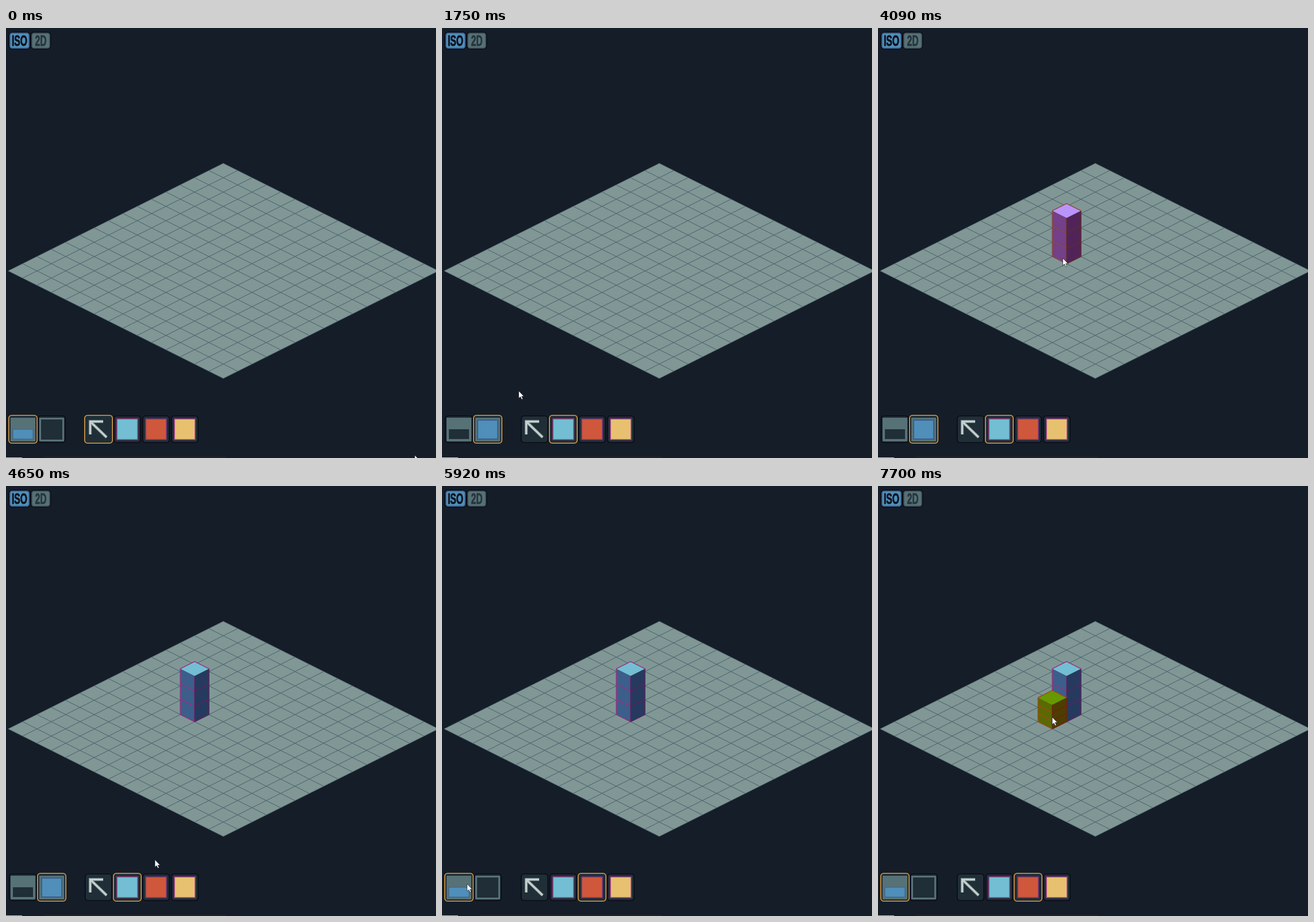
Write an HTML page that moves like this. It is 748 px wide and 748 px high and loops after 8000 ms.

```html
<!DOCTYPE html>
<html lang="en">
<head>
<meta charset="utf-8">
<title>Isometric block editor</title>
<style>
  html, body { margin: 0; width: 100%; height: 100%; overflow: hidden; background: #151d28; }
  svg { display: block; width: 100%; height: 100%; }
  .label { font: bold 25px "Liberation Sans", Arial, sans-serif; stroke-width: .9; }
  .btn { fill: #202e37; stroke: #090a14; stroke-width: 1.6; }
  .btn.on { stroke: #de9e41; }
  .edge { fill: none; stroke-width: 1.5; stroke-linejoin: round; }
</style>
</head>
<body>
<svg viewBox="0 0 748 748">
  <rect width="748" height="748" fill="#151d28"/>
  <polygon id="board" fill="#819796" stroke="#577277"/>
  <path id="lines" fill="none" stroke="#506a70" stroke-width="1.1"/>
  <polygon id="tile" fill="#958ba2"/>
  <g id="blocks"></g>
  <g id="ui"></g>
  <g>
    <rect class="btn" x="5.5" y="7.5" width="36" height="29" rx="5" style="fill:#4f8fba"/>
    <rect x="7" y="9" width="33" height="26" rx="4" fill="none" stroke="#3c5e8b" stroke-width="1.5"/>
    <rect class="btn" x="43.5" y="7.5" width="34" height="29" rx="5" style="fill:#577277"/>
    <rect x="45" y="9" width="31" height="26" rx="4" fill="none" stroke="#394a50" stroke-width="1.5"/>
    <text class="label" transform="translate(10 31) scale(.63 1)" fill="#10141f" stroke="#10141f">ISO</text>
    <text class="label" transform="translate(50.5 31) scale(.63 1)" fill="#26363e" stroke="#26363e">2D</text>
  </g>
  <path d="M66 746.5H382" stroke="#33242f"/>
  <path d="M0 747.5H28" stroke="#c7cfcc"/>
  <circle id="press" r="10" fill="#e6e41e" fill-opacity=".6"/>
  <path id="cursor" d="M0 0V13L3 10.4L5.2 15L7.3 14L5.2 9.6H9.2Z" fill="#fff" stroke="#10141f" stroke-width=".7"/>
</svg>
<script>
const $ = id => document.getElementById(id);
const LOOP = 8000, N = 15, TW = 374 / N, TH = 187 / N, OX = 378, OY = 235.5;

// start, end, x, y, easing
const smooth = p => p * p * (3 - 2 * p), out = p => p * (2 - p);
const START = [711, 743];
const MOVES = [
  [0, 520, 208, 708, smooth],
  [690, 710, 208, 707, smooth],
  [1040, 1400, 82, 700, smooth],
  [1680, 2280, 313, 391, out],
  [2280, 2360, 323, 394, smooth],
  [4020, 4840, 249, 690, smooth],
  [4980, 5560, 32, 705, out],
  [5840, 6490, 303, 402, smooth]
];
const PRESSES = [[900, 1040], [1500, 1570], [2600, 2740], [3020, 3120], [3580, 3680],
  [4890, 4980], [5740, 5830], [6670, 6770], [7050, 7190], [7560, 7700]];

// face colours: top, left, right, edge, dark edge
const STACKS = [
  { i: 5, j: 7, h: 26.6, times: [2650, 3020, 3630],
    plain: ['#73bed3', '#3c5e8b', '#253a5e', '#97307f', '#5e2260'],
    hot: ['#ba94fa', '#734089', '#502458', '#8f4a35', '#622c2a'] },
  { i: 5, j: 8, h: 14, times: [6670, 7050, 7610],
    plain: ['#cf573c', '#a53030', '#752438', '#97307f', '#5e2260'],
    hot: ['#689800', '#586a00', '#4c3e00', '#9c4a1e', '#6b2410'] }
];

const at = (i, j, up = 0) => [OX + (i - j) * TW, OY + (i + j) * TH - up];
const pts = list => list.map(p => p.map(n => n.toFixed(1)).join()).join(' ');
const cell = (i, j, up) => [at(i, j, up), at(i + 1, j, up), at(i + 1, j + 1, up), at(i, j + 1, up)];
const poly = (p, fill) => `<polygon points="${pts(p)}" fill="${fill}"/>`;
const line = (p, stroke) => `<polyline class="edge" points="${pts(p)}" stroke="${stroke}"/>`;
const rect = (x, y, w, h, attrs) => `<rect x="${x}" y="${y}" width="${w}" height="${h}" ${attrs}/>`;

// The selected frame is one pixel larger on every side.
function button(x, w, on) {
  const d = on ? .8 : 1.8;
  return rect(x + d, 673 + d, w - 2 * d, 50 - 2 * d, `rx="5" class="btn${on ? ' on' : ''}"`);
}

function drawBoard() {
  $('board').setAttribute('points', pts([at(0, 0), at(N, 0), at(N, N), at(0, N)]));
  let d = '';
  for (let k = 1; k < N; k++) d += `M${at(k, 0)}L${at(k, N)}M${at(0, k)}L${at(N, k)}`;
  $('lines').setAttribute('d', d);
}

function drawUi(slab, tool) {
  const grey = 'fill="#577277"', dark = 'fill="#202e37"', blue = 'fill="#4f8fba" stroke="#3c5e8b"';
  const modes = [button(4, 51, slab), button(54, 51, !slab)];
  let s = slab ? modes[1] + modes[0] : modes[0] + modes[1];
  s += rect(8, 678, 43, 41, grey) + rect(12, 698, 35, 17, slab ? blue : dark);
  s += rect(58, 678, 43, 41, grey);
  s += slab ? rect(61, 681, 37, 35, dark) : rect(62, 682, 35, 33, blue + ' stroke-width="2"');
  for (let k = 0; k < 4; k++) s += button(136 + 50 * k, 50, k === tool);
  const arrow = 'M169 684.5H146.5V707M147 685L175 712';
  s += `<g fill="none"><path d="${arrow}" stroke="#577277" stroke-width="5.5"/>` +
    `<path d="${arrow}" stroke="#c7cfcc" stroke-width="3.5"/></g>`;
  [['#73bed3', '#a23e8c'], ['#cf573c', '#7a367b'], ['#e8c170', '#a23e8c']].forEach(([fill, edge], k) => {
    s += rect(193 + 50 * k, 680, 36, 36, `fill="${fill}" stroke="${edge}" stroke-width="1.6"`);
  });
  $('ui').innerHTML = s;
}

function stackSvg({ i, j, h, plain, hot }, n, hovered) {
  const [top, left, right, edge, darkEdge] = hovered ? hot : plain;
  const [, e0, s0, w0] = cell(i, j, 0), [a, e, s, w] = cell(i, j, n * h);
  let svg = poly([w0, s0, s, w], left) + poly([s0, e0, e, s], right);
  for (let k = 0; k < n; k++) {
    const [, ek, sk, wk] = cell(i, j, k * h);
    svg += line([sk, ek], darkEdge) + line([wk, sk], edge);
  }
  return svg + line([e0, e], darkEdge) + line([s0, s], darkEdge) + line([w0, w], edge) +
    poly([a, e, s, w], top) + line([w, a, e], edge);
}

function cursorAt(t) {
  let [x, y] = START;
  for (const [t0, t1, tx, ty, ease] of MOVES) {
    if (t <= t0) break;
    const p = ease(Math.min(1, (t - t0) / (t1 - t0)));
    x += (tx - x) * p;
    y += (ty - y) * p;
  }
  return [x, y];
}

function isOver({ i, j, h }, n, x, y) {
  const [cx, cy] = at(i + .5, j + .5), room = TH * (1 - Math.abs(x - cx) / TW);
  return n > 0 && room > 0 && y < cy + room && y > cy - n * h - room;
}

// Runs draw only when its arguments change.
function memo(draw) {
  let last;
  return (...args) => {
    const key = args.join();
    if (key !== last) { last = key; draw(...args); }
  };
}

const showUi = memo(drawUi);
const showBlocks = memo((...state) => {
  $('blocks').innerHTML = STACKS.map((st, k) =>
    state[2 * k] ? stackSvg(st, state[2 * k], state[2 * k + 1]) : '').join('');
});
const showTile = memo((i, j, on) => {
  $('tile').setAttribute('points', on ? pts(cell(i, j)) : '');
});

function render(t) {
  const [x, y] = cursorAt(t), place = `translate(${x.toFixed(1)} ${y.toFixed(1)})`;
  $('cursor').setAttribute('transform', place);
  $('press').setAttribute('transform', place);
  $('press').style.display = PRESSES.some(([a, b]) => t >= a && t < b) ? '' : 'none';

  showUi(t < 1570 || t >= 5830, t < 1040 ? 0 : t < 4980 ? 1 : 2);

  const counts = STACKS.map(st => st.times.filter(s => t >= s).length);
  const over = STACKS.map((st, k) => isOver(st, counts[k], x, y));
  if (over[1]) over[0] = false;
  showBlocks(counts[0], over[0], counts[1], over[1]);

  const u = (x - OX) / TW, v = (y - OY) / TH;
  const i = Math.floor((u + v) / 2), j = Math.floor((v - u) / 2);
  const inside = Math.min(i, j) >= 0 && Math.max(i, j) < N;
  showTile(i, j, t >= 1040 && inside && !over.includes(true));
}

drawBoard();
const begin = performance.now();
function tick() {
  render((performance.now() - begin) % LOOP);
  requestAnimationFrame(tick);
}
tick();
</script>
</body>
</html>
```
